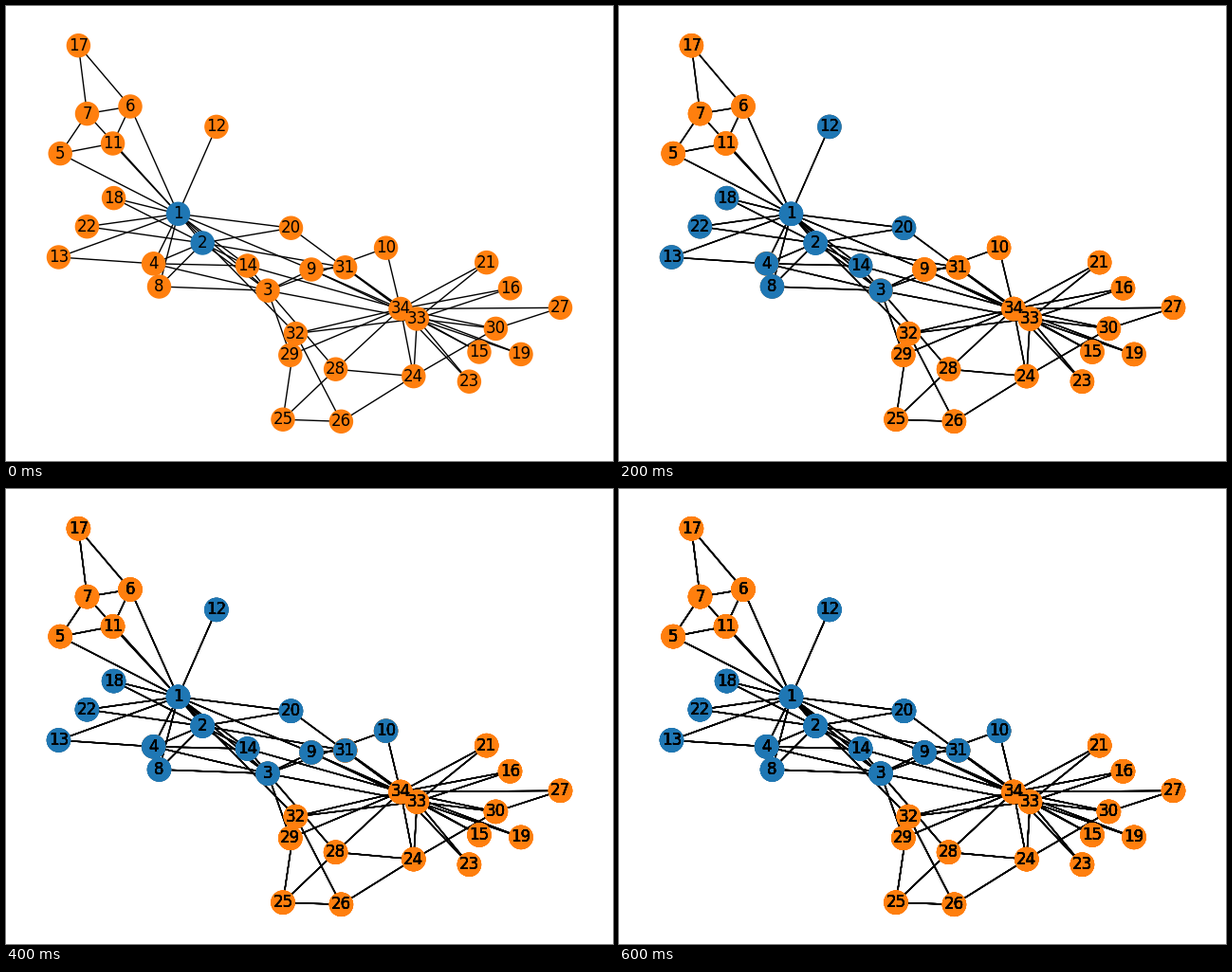
Recreate the animation shown at these times as a matplotlib script. Size 640 by 480 pixels, loop 0.7 s.

```python
from itertools import combinations, product

import matplotlib.pyplot as plt
from matplotlib.animation import FuncAnimation
from matplotlib.collections import LineCollection

W, H, DPI = 640, 480, 100
STEPS, INTERVAL = 7, 100
THRESHOLD = 0.4
SEEDS = {1, 2}
ADOPTED, OTHER = "tab:blue", "tab:orange"

# Node centres in pixels, for nodes 1 to 34
POINTS = [
    (181.5, 219.3), (207.2, 250), (276, 300.2), (155.6, 271.8), (57.2, 155.6),
    (131, 106), (85.5, 113.6), (161.5, 296), (322, 278), (400.6, 255.2),
    (112.6, 145), (221.9, 127.4), (55.5, 265), (254.6, 274), (499, 365),
    (531.5, 297.8), (76.4, 41.7), (113.6, 202.6), (543, 367.4), (300.5, 234.2),
    (506.7, 270.6), (85.4, 232.7), (488.4, 396.2), (429.8, 390.6), (292, 436.2),
    (353.4, 438.3), (584.5, 318.3), (347.6, 383.2), (299.8, 368.3), (516.4, 340.4),
    (357.6, 275.8), (305.4, 345.6), (433.4, 330), (416, 319.5),
]
POS = dict(enumerate(POINTS, start=1))


def clique(*nodes):
    return combinations(nodes, 2)


def path(*nodes):
    return zip(nodes, nodes[1:])


def karate_club():
    """Edges of the karate club graph, built from its motifs."""
    parts = [
        clique(1, 2, 3, 4, 8),
        clique(1, 2, 3, 4, 14),
        product([1, 2], [18, 20, 22]),
        product([1], [5, 6, 7, 9, 11, 12, 13, 32]),
        path(11, 5, 7, 17, 6, 11),
        path(6, 7),
        path(4, 13),
        path(2, 31, 9, 3),
        path(28, 3, 29, 32, 25),
        path(10, 3, 33, 34),
        path(26, 32),
        path(27, 30, 24, 26, 25, 28, 24),
        product([33, 34], [9, 15, 16, 19, 21, 23, 24, 30, 31, 32]),
        product([34], [10, 14, 20, 27, 28, 29]),
    ]
    return sorted({tuple(sorted(edge)) for part in parts for edge in part})


EDGES = karate_club()


def neighbours():
    near = {n: set() for n in POS}
    for a, b in EDGES:
        near[a].add(b)
        near[b].add(a)
    return near


def spread(active, near):
    """Nodes adopt once enough of their neighbours have."""
    return active | {n for n, ns in near.items()
                     if len(ns & active) / len(ns) >= THRESHOLD}


def draw_graph(ax, active):
    lines = LineCollection([(POS[a], POS[b]) for a, b in EDGES],
                           colors="black", linewidths=1, zorder=1)
    ax.add_collection(lines, autolim=False)
    colors = [ADOPTED if n in active else OTHER for n in POS]
    nodes = ax.scatter(*zip(*POINTS), s=300, c=colors, zorder=2)
    labels = [ax.text(x, y, str(n), size=12, family="DejaVu Sans",
                      color="black", ha="center", va="center", zorder=3)
              for n, (x, y) in POS.items()]
    return [lines, nodes, *labels]


fig = plt.figure(figsize=(W / DPI, H / DPI), dpi=DPI, facecolor="white")
ax = fig.add_axes((0, 0, 1, 1))
ax.set_axis_off()

layers, active, near = [], set(SEEDS), neighbours()
for _ in range(STEPS):
    layers.append(draw_graph(ax, active))
    active = spread(active, near)
ax.set_xlim(0, W)
ax.set_ylim(H, 0)


def update(step):
    # Layers pile up, so lines and labels darken with each step
    for i, layer in enumerate(layers):
        for artist in layer:
            artist.set_visible(i <= step)
    return [artist for layer in layers for artist in layer]


anim = FuncAnimation(fig, update, frames=STEPS, interval=INTERVAL,
                     repeat=True, repeat_delay=0)
plt.show()
```
